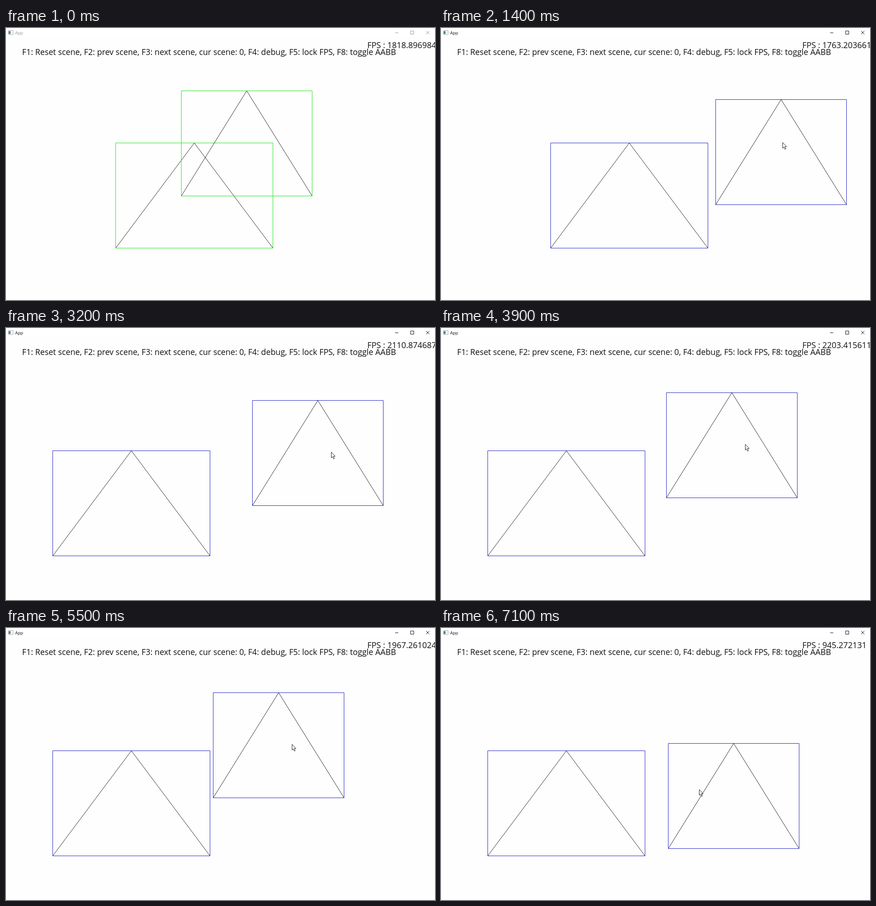
These frames come from a looping animation (941 px wide and 595 px high, 7.2 s). An HTML page with a canvas:

```html
<!DOCTYPE html>
<html lang="en">
<head>
<meta charset="utf-8">
<title>App</title>
<style>
  html, body { margin: 0; width: 100%; height: 100%; overflow: hidden; background: #fefefe; }
  canvas { display: block; }
</style>
</head>
<body>
<canvas id="stage" width="941" height="595"></canvas>
<script>
const ctx = document.getElementById('stage').getContext('2d');
const STEP = 100, STEPS = 72;
const HELP = 'F1: Reset scene, F2: prev scene, F3: next scene, cur scene: 0, ' +
  'F4: debug, F5: lock FPS, F8: toggle AABB';

// Turning points of the cursor: [step, x, y]
const path = [
  [2, 490, 551], [8, 531, 231], [14, 749, 249.5],
  [19, 450, 379], [23, 309, 369], [26, 312, 396],
  [29, 775, 269], [32, 713, 271], [45, 628, 240],
  [50, 628, 240], [60, 626, 268], [68, 671, 365], [71, 566, 353]
];
const arrow = new Path2D('M.5 .5V13L3.3 10.4L5.4 15.3L7.4 14.4L5.3 9.6H9Z');

const clamp = (v, lo, hi) => Math.min(hi, Math.max(lo, v));

function cursorAt(step) {
  const i = clamp(path.findIndex(k => k[0] >= step), 1, path.length - 1);
  const [s0, x0, y0] = path[i - 1], [s1, x1, y1] = path[i];
  const u = clamp((step - s0) / (s1 - s0), 0, 1);
  // Sideways nudging that makes the boxes touch twice
  const sway = step > 45 && step < 65 ? 4.75 * (1 + Math.cos((step - 50) * Math.PI / 5)) : 0;
  return { x: x0 + (x1 - x0) * u - sway, y: y0 + (y1 - y0) * u };
}

// A shape follows the cursor only while it is being dragged.
function dragged(step, from, to, dx, dy, w, h) {
  const c = cursorAt(clamp(step, from, to));
  return { x: Math.round(c.x - dx), y: Math.round(c.y - dy), w, h };
}

function fpsAt(step) {
  const noise = Math.abs(Math.sin(step * 12.9898 + 1) * 43758.5453) % 1;
  return (step < 63 ? 1300 + noise * 950 : 800 + noise * 150).toFixed(6);
}

function line(color, points, close) {
  ctx.beginPath();
  for (const [x, y] of points) ctx.lineTo(x + 0.5, y + 0.5);
  if (close) ctx.closePath();
  ctx.strokeStyle = color;
  ctx.stroke();
}

function box(color, x, y, w, h) {
  line(color, [[x, y], [x + w, y], [x + w, y + h], [x, y + h]], true);
}

function text(str, x, y, size, color) {
  ctx.font = `${size}px "Open Sans", sans-serif`;
  ctx.fillStyle = color;
  ctx.fillText(str, x, y);
}

function drawShape({ x, y, w, h }, boxColor) {
  line('#222', [[x, y + h], [x + w / 2, y], [x + w, y + h]]);
  box(boxColor, x, y, w, h);
}

function drawTitleBar(active) {
  const ink = active ? '#111' : '#999';
  ctx.fillStyle = '#fff';
  ctx.fillRect(0, 0, 941, 20);
  ctx.fillStyle = '#4a8a8c';
  ctx.fillRect(6, 7, 4, 6);
  box('#aaa', 5, 5, 10, 9);
  text('App', 20, 13.5, 9.5, ink);
  line(ink, [[853, 10], [860, 10]]);
  box(ink, 887, 6, 7, 7);
  line(ink, [[921, 6], [928, 13]]);
  line(ink, [[928, 6], [921, 13]]);
}

function drawCursor({ x, y }) {
  ctx.save();
  ctx.translate(Math.round(x), Math.round(y));
  ctx.fillStyle = '#fff';
  ctx.strokeStyle = '#222';
  ctx.fill(arrow);
  ctx.stroke(arrow);
  ctx.restore();
}

function draw(step) {
  const a = dragged(step, 19, 26, 210, 128, 345, 230);
  const b = step < 29
    ? dragged(step, 8, 14, 147, 94, 287, 230)
    : dragged(step, 29, 68, 173, 113, 287, 230);
  const overlap = b.x < a.x + a.w && a.x < b.x + b.w && b.y < a.y + a.h && a.y < b.y + b.h;
  const boxColor = overlap ? '#1ee41e' : '#2828c4';

  ctx.fillStyle = '#fefefe';
  ctx.fillRect(0, 0, 941, 595);
  drawTitleBar(step >= 8);
  drawShape(a, boxColor);
  drawShape(b, boxColor);
  text(HELP, 35.3, 59, 17.78, '#111');
  text('FPS : ' + fpsAt(step), 792.4, 43.5, 17.95, '#111');
  if (step >= 2) drawCursor(cursorAt(step));
}

function tick() {
  draw(Math.floor(performance.now() / STEP) % STEPS);
  requestAnimationFrame(tick);
}
tick();
</script>
</body>
</html>
```
